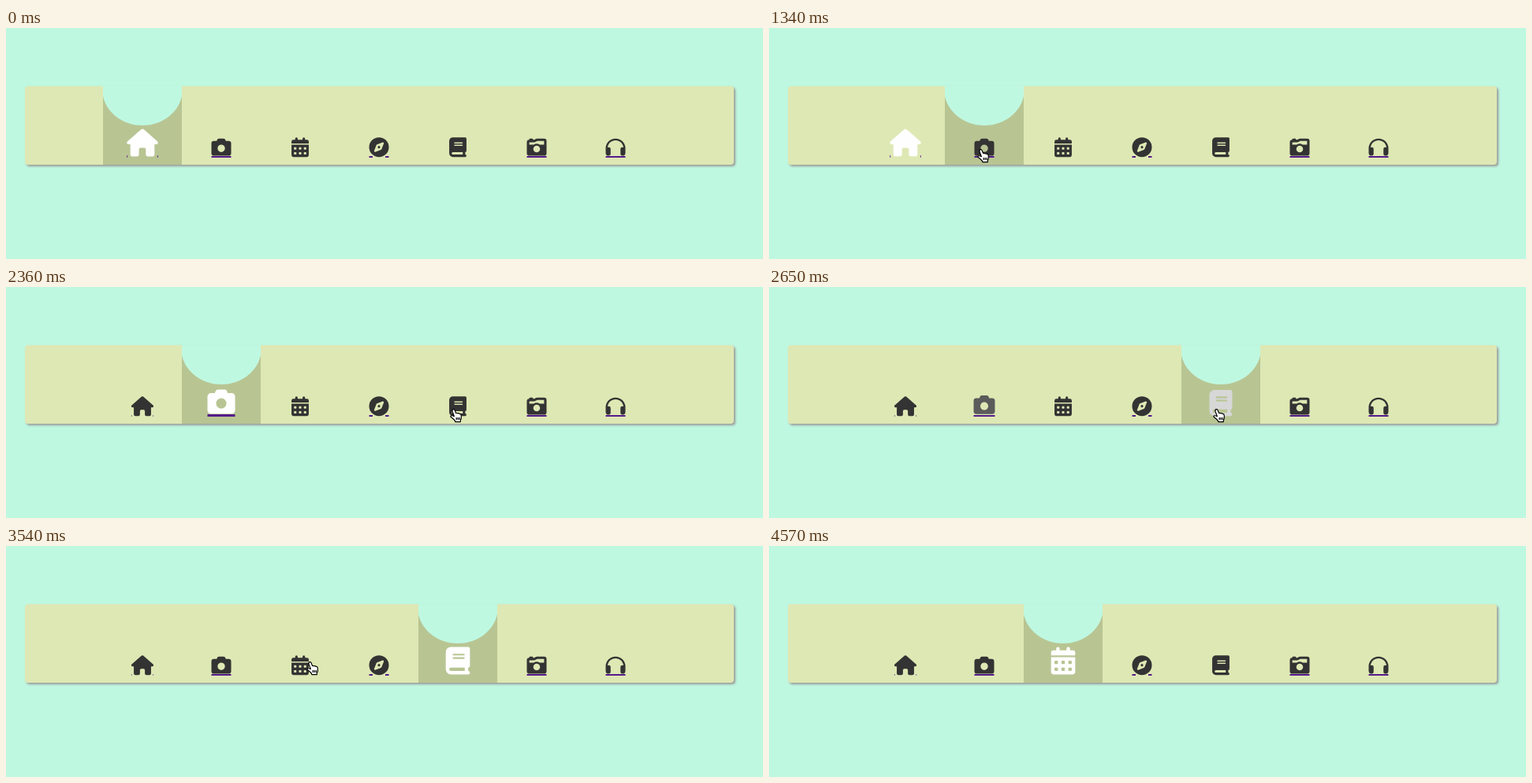
An HTML page with a canvas for the animation above (4850 ms loop, 960 by 294 pixels).

```html
<!DOCTYPE html>
<html lang="en">
<head>
<meta charset="utf-8">
<title>Icon menu</title>
<style>
  html, body { margin: 0; width: 100%; height: 100%; overflow: hidden; background: #bff8e1; }
  canvas { display: block; }
</style>
</head>
<body>
<canvas width="960" height="294"></canvas>
<script>
const ctx = document.querySelector('canvas').getContext('2d');
const LOOP = 4850, STEP = 147;
const PAGE = '#bff8e1', BAR = '#dee8b4', TAB = '#b8c593', LINK = '#551a8b';

// Path data helpers
const box = (x, y, w, h, r) =>
  `M${x + r} ${y}h${w - 2 * r}a${r} ${r} 0 0 1 ${r} ${r}v${h - 2 * r}a${r} ${r} 0 0 1 ${-r} ${r}` +
  `h${2 * r - w}a${r} ${r} 0 0 1 ${-r} ${-r}v${2 * r - h}a${r} ${r} 0 0 1 ${r} ${-r}z`;
const disc = (x, y, r) => `M${x - r} ${y}a${r} ${r} 0 1 1 ${2 * r} 0a${r} ${r} 0 1 1 ${-2 * r} 0z`;
const days = [256, 384].flatMap(y => [64, 192, 320].map(x => box(x, y, 64, 64, 16))).join('');

// Glyphs on a 512 unit em; "line" is the underline left visible at each end (.5 = all of it)
const icon = (width, line, d) => ({ width, line, path: new Path2D(d) });
const icons = [
  icon(576, .02, 'M288 0Q302 0 310 7L565 231Q576 242 576 256A32 32 0 0 1 544 288H512V472A40 40 0 0 1 472 512' +
    'H392A40 40 0 0 1 352 472V384A32 32 0 0 0 320 352H256A32 32 0 0 0 224 384V472A40 40 0 0 1 184 512H104' +
    'A40 40 0 0 1 64 472V288H32A32 32 0 0 1 0 256Q0 242 11 231L266 8Q274 0 288 0Z'),
  icon(512, .5, 'M149 65L139 96H64A64 64 0 0 0 0 160V416A64 64 0 0 0 64 480H448A64 64 0 0 0 512 416V160' +
    'A64 64 0 0 0 448 96H373L363 65A48 48 0 0 0 317 32H195A48 48 0 0 0 149 65Z' + disc(256, 288, 96)),
  icon(448, 0, 'M128 0a32 32 0 0 1 32 32V64H288V32a32 32 0 0 1 64 0V64h48a48 48 0 0 1 48 48v48H0V112' +
    'A48 48 0 0 1 48 64H96V32A32 32 0 0 1 128 0ZM0 192H448V464a48 48 0 0 1 -48 48H48a48 48 0 0 1 -48 -48Z' + days),
  icon(512, .18, disc(256, 256, 256) + 'M307 325L162 381c-19 7-38-12-31-31l56-145c3-8 10-15 18-18l145-56' +
    'c19-7 38 12 31 31L325 307c-3 8-10 15-18 18z' + disc(256, 256, 32)),
  icon(448, 0, 'M96 0A96 96 0 0 0 0 96V416A96 96 0 0 0 96 512H416a32 32 0 0 0 0 -64V384a32 32 0 0 0 32 -32V32' +
    'a32 32 0 0 0 -32 -32ZM96 384H352v64H96a32 32 0 0 1 0 -64Z' +
    box(128, 128, 224, 32, 16) + box(128, 192, 224, 32, 16)),
  icon(512, .5, 'M221 121L271 96H448v96H333a136 136 0 0 0 -154 0H64V128H192Q207 128 221 121ZM0 128V416' +
    'a64 64 0 0 0 64 64H448a64 64 0 0 0 64 -64V96a64 64 0 0 0 -64 -64H271q-15 0 -29 7L192 64H160V48' +
    'a16 16 0 0 0 -16 -16H80a16 16 0 0 0 -16 16V64A64 64 0 0 0 0 128Z' + disc(256, 304, 88)),
  icon(512, .5, 'M256 80C150 80 62 159 50 262q14-6 30-6a48 48 0 0 1 48 48V432a48 48 0 0 1 -48 48' +
    'a80 80 0 0 1 -80 -80V288a256 256 0 0 1 512 0V400a80 80 0 0 1 -80 80a48 48 0 0 1 -48 -48V304' +
    'a48 48 0 0 1 48 -48q16 0 30 6C450 159 362 80 256 80Z'),
];
const iconX = i => 173 + 100 * i;

const arrow = new Path2D('M.6.6V16.4L4.2 13 6.5 18.4 8.9 17.4 6.6 12.1H11.6Z');
const hand = new Path2D('M5.4 9.6L3 3.2Q2.6 1 4.2.7T6.2 2L7.6 5.6Q8.6 4.8 9.8 5.9Q11 5 12.2 6.5Q13.8 6.2 14.2 8.2' +
  'L14.4 11.5Q14.2 13.5 13.3 14.5V16.6H6.8L6.3 15Q4.6 13 1.2 10.6Q.5 9.2 1.6 8.8Q3.4 8.6 5.4 9.6Z');
const creases = new Path2D('M8.2 11V14M10.2 11V14M12.2 11V14');

// Pointer moves: start, end, from, to
const moves = [
  [600, 1029, [361, 212], [269, 155]],
  [1663, 2350, [269, 155], [568, 156]],
  [2800, 3528, [568, 156], [386, 148]],
  [3960, 4410, [386, 148], [946, 285]],
];
const clicks = [[-1000, 0], [1320, 1], [2495, 4], [3660, 2]];

const clamp = x => Math.min(1, Math.max(0, x));
const smooth = x => x * x * (3 - 2 * x);

// CSS "ease": cubic-bezier(.25, .1, .25, 1)
function ease(x) {
  const bez = (a, b, s) => 3 * a * s * (1 - s) ** 2 + 3 * b * s * s * (1 - s) + s ** 3;
  let lo = 0, hi = 1;
  for (let i = 0; i < 20; i++) {
    const mid = (lo + hi) / 2;
    if (bez(.25, .25, mid) < x) lo = mid; else hi = mid;
  }
  return bez(.1, 1, hi);
}

function drawIcon(i, grow) {
  const { width, path, line } = icons[i];
  const size = 25 + 10 * grow, scale = size / 512;
  const w = width * scale, left = iconX(i) - w / 2;
  const thick = Math.round(size / 12), stub = line * w;
  const baseline = Math.round(163.65 - size / 8);
  const grey = Math.round(51 + 204 * grow);
  ctx.fillStyle = LINK;
  ctx.fillRect(left, 165 - thick, stub, thick);
  ctx.fillRect(left + w - stub, 165 - thick, stub, thick);
  ctx.save();
  ctx.translate(left, baseline - size * 7 / 8);
  ctx.scale(scale, scale);
  ctx.fillStyle = `rgb(${grey},${grey},${grey})`;
  ctx.fill(path, 'evenodd');
  ctx.restore();
}

function drawPointer(now) {
  const [start, end, from, to] = moves.findLast(move => move[0] <= now) || moves[0];
  const s = smooth(clamp((now - start) / (end - start)));
  const [x, y] = from.map((v, i) => v + (to[i] - v) * s);
  const over = y > 135 && y < 166 && icons.some((_, i) => Math.abs(x - iconX(i)) < 18);
  const shape = over ? hand : arrow;
  ctx.save();
  ctx.translate(Math.round(over ? x - 5 : x), Math.round(over ? y - 1 : y));
  ctx.fillStyle = '#fff';
  ctx.strokeStyle = '#000';
  ctx.lineWidth = 1.2;
  ctx.lineJoin = 'round';
  ctx.fill(shape);
  ctx.stroke(shape);
  if (over) ctx.stroke(creases);
  ctx.restore();
}

function drawBar(active) {
  ctx.save();
  ctx.shadowColor = '#999';
  ctx.shadowOffsetX = ctx.shadowOffsetY = 2;
  ctx.shadowBlur = 3;
  ctx.fillStyle = BAR;
  ctx.fill(new Path2D(box(24, 74, 899, 100, 4)));
  ctx.restore();

  const x = iconX(active);
  ctx.save();
  ctx.beginPath();
  ctx.rect(x - 50, 74, 100, 100);
  ctx.clip();
  ctx.fillStyle = TAB;
  ctx.fillRect(x - 50, 74, 100, 100);
  ctx.fillStyle = PAGE;
  ctx.fillRect(x - 50, 74, 100, 5);
  ctx.beginPath();
  ctx.ellipse(x, 78, 51, 46, 0, 0, 2 * Math.PI);
  ctx.fill();
  ctx.restore();
}

function draw(time) {
  const now = Math.floor(time / STEP) * STEP; // the screen refreshes in coarse steps
  const k = clicks.findLastIndex(click => click[0] <= now);
  const [start, active] = clicks[k];
  const previous = k ? clicks[k - 1][1] : -1;
  const grow = ease(clamp((now - start) / 300));

  ctx.fillStyle = PAGE;
  ctx.fillRect(0, 0, 960, 294);
  drawBar(active);
  icons.forEach((_, i) => drawIcon(i, i === active ? grow : i === previous ? 1 - grow : 0));
  if (now > 440 && now < 4500) drawPointer(now);
}

const origin = performance.now();
function tick() {
  draw((performance.now() - origin) % LOOP);
  requestAnimationFrame(tick);
}
tick();
</script>
</body>
</html>
```
